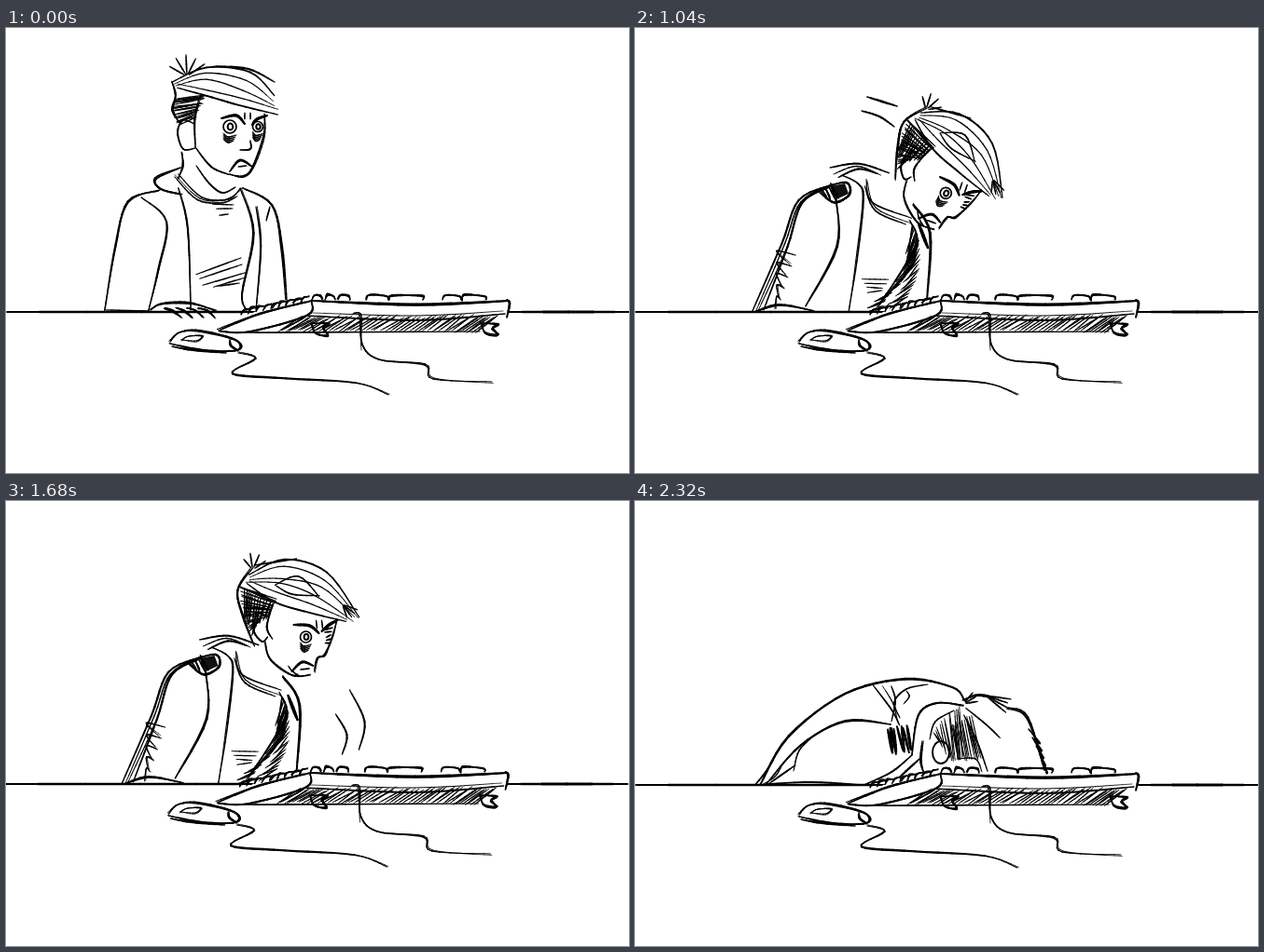
An HTML page with a canvas for the animation above (3230 ms loop, 668 by 478 pixels).

```html
<!DOCTYPE html>
<html lang="en">
<head>
<meta charset="utf-8">
<title>Desk</title>
<style>
html, body { margin: 0; width: 100%; height: 100%; overflow: hidden; background: #fff; }
canvas { display: block; }
</style>
</head>
<body>
<canvas id="stage" width="668" height="478"></canvas>
<script>
const g = document.getElementById('stage').getContext('2d');
const rad = Math.PI / 180;
let seed = 1;
const rnd = () => (seed = seed * 16807 % 2147483647) / 2147483647 - 0.5;

const points = s => s.split(' ').map(p => p.split(',').map(Number));
const mix = (p, q, t) => p.map((v, n) => v + (q[n] - v) * t);
const shake = (p, r) => p.map(v => v + rnd() * r);

// Catmull-Rom position at t in 0..1
function along(pts, t) {
  const last = pts.length - 1, i = Math.min(last - 1, Math.floor(t * last)), u = t * last - i;
  const at = k => pts[Math.max(0, Math.min(last, k))];
  const [a, b, c, d] = [at(i - 1), at(i), at(i + 1), at(i + 2)];
  return b.map((v, n) => v + 0.5 * u * (c[n] - a[n] +
    u * (2 * a[n] - 5 * v + 4 * c[n] - d[n] + u * (3 * (v - c[n]) + d[n] - a[n]))));
}

// Brush line, thinner at both ends
function brush(pts, w) {
  const n = (pts.length - 1) * 6;
  for (let i = 0; i < n; i++) {
    g.lineWidth = w * (0.65 + 0.45 * Math.sin(Math.PI * (i + 0.5) / n));
    g.beginPath();
    g.moveTo(...along(pts, i / n));
    g.lineTo(...along(pts, (i + 1) / n));
    g.stroke();
  }
}

const pen = (s, w = 1.7) => brush(points(s), w);

// A firm line with a loose one over it
function rough(s, w = 1.9, warp = p => p) {
  const pts = points(s).map(warp);
  brush(pts, w);
  brush(pts.map(p => shake(p, 3)), w * 0.7);
}

// Strokes running from guide a across to guide b
function shade(a, b, n, w = 1.1) {
  const [p, q] = [points(a), points(b)];
  for (let i = 0; i < n; i++) {
    const t = i / (n - 1);
    brush([shake(along(p, t), 3), shake(along(q, t), 4)], w);
  }
}

// Curves blending guide a into guide b
function strands(a, b, n, w = 1.5) {
  const [p, q] = [points(a), points(b)];
  for (let i = 0; i < n; i++) {
    const t = i / (n - 1), edge = t % 1 ? 5 : 1;
    brush(p.map((v, k) => shake(mix(v, q[k], t), edge)), t % 1 ? w * 0.8 : w * 1.2);
  }
}

// Spikes around a centre, angles in degrees
function fan(x, y, near, far, from, to, n, w = 1.6) {
  for (let i = 0; i < n; i++) {
    const a = (from + (to - from) * i / (n - 1)) * rad, r = far + rnd() * 5;
    brush([[x + near * Math.cos(a), y + near * Math.sin(a)], [x + r * Math.cos(a), y + r * Math.sin(a)]], w);
  }
}

function fill(s, color = '#fff') {
  g.fillStyle = color;
  g.beginPath();
  points(s).forEach(p => g.lineTo(...p));
  g.fill();
}

function oval(x, y, rx, ry, w = 1.7) {
  g.lineWidth = w;
  g.beginPath();
  g.ellipse(x, y, rx, ry, 0, 0, 7);
  g.stroke();
}

function eye(x, y, r) {
  oval(x, y, r, r);
  oval(x + 0.5, y, r * 0.4, r * 0.5, 2);
  for (let i = 0; i < 4; i++) {
    const d = r + 2 + i * 2;
    brush([[x - r, y + d - 2], [x - 2, y + d + 2], [x + r - i, y + d]], 1.3);
  }
}

function desk() {
  pen('1,305 290,305', 2.4);
  pen('538,305 668,305', 2.6);
}

function keyboard() {
  fill('228,326 270,303 327,292 440,295 540,293 538,308 526,318 508,327 300,327 250,328');
  rough('228,325 272,307 327,293', 2.2);
  rough('229,326 262,326 322,309 328,294', 2);
  rough('328,293 440,297 537,293', 2.8);
  pen('322,309 440,314 535,307', 2);
  pen('329,306 440,309 533,304', 1);
  pen('537,292 540,296 537,311', 2.4);
  pen('250,327 300,327 508,326', 1.6);
  shade('292,325 505,326', '318,311 528,309', 52, 1.2);
  for (const x of [328, 510]) {
    rough(`${x},317 ${x + 18},318 ${x + 12},322 ${x + 17},330 ${x + 4},328 ${x},317`, 2);
  }
  // keys
  for (let x = 252; x < 318; x += 8) {
    const y = 306 - (x - 252) * 0.21;
    rough(`${x},${y + 2} ${x + 3},${y - 3} ${x + 9},${y - 4}`, 1.7);
  }
  for (const [x, w] of [[328, 11], [342, 11], [356, 13], [386, 24], [411, 36], [468, 20], [489, 26]]) {
    rough(`${x},292 ${x + 3},287 ${x + w - 2},288 ${x + w},292`, 1.7);
  }
  // lead
  rough('373,306 381,309 382,340 400,356 449,362 458,377 521,380', 1.5);
  pen('379,307 381,346', 1);
}

function mouse() {
  fill('176,338 190,325 215,325 246,335 248,346 215,346 185,342');
  rough('176,337 186,327 208,325 246,335 248,346 214,346 176,339', 2);
  rough('188,335 196,331 210,331 204,336 188,335', 1.2);
  pen('240,335 241,341 248,346', 2.4);
  pen('178,342 200,346 236,349', 2);
  rough('249,349 268,355 243,371 300,376 375,381 410,394', 1.6);
}

function headUp() {
  strands('178,58 215,42 262,47 288,72', '184,64 215,73 250,83 291,93', 5);
  pen('225,41 260,44 288,58', 2);
  fan(194, 52, 3, 22, -150, -35, 5);
  rough('178,58 182,72 178,88 186,102', 1.7);
  shade('182,76 179,88 185,103', '214,72 207,84 203,96', 22, 1.2);
  rough('207,76 202,98 203,128', 1.6);
  pen('202,103 190,99 184,112 190,130 203,129', 1.8);
  rough('203,128 220,149 238,157', 1.7);
  rough('277,92 276,116 264,150 254,159 238,157', 1.7);
  pen('231,97 247,94 256,103', 2.9);
  pen('264,104 269,98 280,94', 2.9);
  eye(240, 106, 7);
  eye(270, 106, 5.5);
  for (const x of [256, 262]) pen(`${x},91 ${x},98`, 1.3);
  pen('262,121 262,130 251,131', 1.8);
  pen('240,154 251,142 264,149', 2.5);
  pen('249,149 258,148', 1.5);
}

// pull draws the near elbow back along the desk
function bodyUp(pull) {
  const warp = ([x, y]) => [x - pull * Math.max(0, Math.min(1, (y - 190) / 110)), y];
  rough('165,174 131,187 117,235 106,303', 2, warp);
  rough('145,182 172,208 163,260 153,303', 1.8, warp);
  rough('107,304 153,304', 1.6, warp);
  rough('188,133 190,148 184,162', 1.6);
  pen('204,148 218,167 232,177 246,171', 1.8);
  rough('187,150 160,161 166,173 188,179', 2);
  strands('185,157 210,182 238,184 251,172', '181,160 205,184 232,188 248,181', 3, 1.3);
  rough('185,172 195,215 198,303', 1.7);
  rough('251,172 265,220 253,285 258,303', 1.8);
  rough('268,192 273,235 268,303', 1.7);
  rough('254,172 285,190 296,235 301,292', 2.2);
  pen('283,192 279,207', 1.6);
  shade('205,266 212,275 230,278', '250,248 256,261 252,276', 5, 1.4);
  shade('221,190 229,200', '243,190 240,200', 3, 1.3);
}

// size 1 spreads the whole hand, 0 hides it
function hand(size) {
  if (!size) return;
  const x = 155, tip = x + 70 * size, drop = size > 0.9 ? 7 : 0;
  rough(`${x},303 ${x + 12},296 ${mix([x], [tip], 0.6)},295 ${tip},304`);
  for (let i = 0; i < 4; i++) {
    const k = x + (15 + i * 12) * size;
    rough(`${k},${297 + drop / 2} ${k + 9 * size},${300 + drop / 2} ${k + 18 * size},${304 + drop}`, 1.8);
  }
}

function bodyLean() {
  strands('212,168 176,185 157,232 126,304', '208,171 179,188 163,235 138,303', 4, 1.7);
  rough('215,182 217,235 183,299', 1.9);
  rough('130,304 155,297 192,304', 1.9);
  for (let y = 236; y < 290; y += 12) rough(`${172 - (y - 236) / 3},${y + 8} 152,${y + 4} ${166 - (y - 236) / 3},${y + 18}`, 1.2);
  fill('209,170 225,167 229,178 216,184', '#111');
  rough('198,173 226,166 230,179 213,187 198,175', 2.2);
  shade('200,172 211,168', '207,183 218,184', 6, 1.7);
  strands('209,150 240,146 272,156', '218,160 240,151 260,156', 3, 1.6);
  rough('222,158 240,168 245,185 238,250 229,304', 1.6);
  strands('248,163 255,187 297,204', '246,170 258,196 290,211', 3, 1.3);
  shade('298,212 300,250 262,300', '292,240 285,270 248,304', 26, 1.4);
  shade('304,225 303,260 292,290', '298,246 288,276 272,300', 16, 1.3);
  rough('295,207 300,235 258,304', 1.8);
  rough('298,190 316,220 313,290', 2.2);
  pen('304,210 314,236', 3.4);
  shade('244,269 250,284', '270,270 266,283', 4, 1.2);
}

function headProfile() {
  strands('262,80 300,64 345,78 380,126', '260,90 290,110 328,121 366,130', 6);
  strands('290,91 315,82 337,103', '290,91 308,101 337,103', 2, 1.3);
  fan(266, 75, 3, 17, -130, -35, 4);
  pen('268,70 313,63', 1.8);
  fan(362, 112, 2, 17, 20, 70, 4, 1.5);
  rough('266,73 250,97 256,125 268,157', 1.9);
  shade('252,92 256,118 265,145', '290,108 282,120 270,132', 20, 1.4);
  shade('258,96 270,104 288,110', '258,126 266,136 280,126', 14, 1.4);
  pen('283,125 271,123 267,140 276,152 282,147', 1.9);
  rough('288,112 281,136 287,149', 1.6);
  rough('279,153 285,171 308,188 328,188', 1.8);
  rough('356,129 352,146 343,166 335,170 332,184', 1.8);
  pen('310,134 327,135 337,143', 3);
  pen('340,141 348,134 357,129', 3);
  eye(323, 147, 6);
  shade('343,139 345,154', '353,138 350,153', 5, 1.6);
  for (const x of [334, 340]) pen(`${x},129 ${x + 1},138`, 1.4);
  pen('308,184 319,174 331,178', 2.6);
  pen('317,182 327,181', 1.6);
  shade('304,178 311,186', '309,184 317,189', 3, 1.3);
}

function slump() {
  rough('135,304 165,253 225,207 290,191 340,200 353,214', 2.2);
  rough('140,305 178,262 225,237 274,240', 2);
  strands('128,305 139,293 148,278', '143,304 158,294 172,284', 3, 1.5);
  pen('170,290 176,268 192,252', 1.4);
  pen('140,304 190,302 245,305', 1.8);
  strands('255,198 275,224 284,241', '275,199 279,214 275,237', 3, 1.4);
  pen('284,233 278,216 291,202 314,197', 1.6);
  pen('288,218 294,210 291,204', 1.3);
  rough('297,273 304,230 324,217 352,220', 2);
  rough('308,258 306,278 309,291', 1.8);
  shade('271,245 293,242', '274,271 297,268', 9, 2.6);
  rough('297,273 275,291 246,305', 1.7);
  rough('305,277 284,296');
  // head
  rough('352,214 368,208 386,211', 2);
  rough('400,222 421,232 439,289', 2);
  fan(352, 218, 3, 17, -50, -10, 3);
  fan(376, 209, 3, 27, 8, 40, 4);
  for (let i = 0; i < 5; i++) rough(`${422 + i * 4},${245 + i * 9} ${434 + i * 2},${260 + i * 8} ${428 + i * 3},${256 + i * 8}`, 1.8);
  strands('355,222 376,240 391,254', '353,230 367,258 378,290', 2, 1.4);
  shade('320,250 332,234 348,222', '327,258 340,278 352,274', 14, 1.1);
  shade('340,242 360,230', '345,278 370,276', 16, 1.1);
  pen('316,256 322,237 342,225', 1.5);
  oval(328, 270, 9, 12, 2);
  pen('345,277 365,277 372,291', 1.3);
}

function impact() {
  for (let i = 0; i < 4; i++) {
    const x = 318 + i * 26, y = 120 + i * 8;
    pen(`${x},${y} ${x + 28},${y + 30} ${x + 40},${y + 70}`, 1.8);
  }
}

function upright(pull, size) {
  bodyUp(pull);
  headUp();
  hand(size);
}

function drop() {
  bodyLean();
  g.save();
  g.translate(294, 148);
  g.rotate(25 * rad);
  g.translate(-275, -137);
  headProfile();
  g.restore();
  pen('249,74 281,84', 2.2);
  pen('243,89 262,95 278,106', 2);
}

function lift() {
  bodyLean();
  headProfile();
  pen('355,230 367,252 362,273', 1.9);
  pen('370,204 386,238 380,268', 1.9);
}

function slam() {
  slump();
  impact();
}

// start time, pose, jolt of the whole stage
const cues = [
  [0, () => upright(0, 1)], [480, () => upright(5, 0.7)],
  [640, () => upright(8, 0.4)], [720, () => upright(10, 0)],
  [1040, drop], [1200, slam, 1], [1280, slam],
  [1440, lift, 1], [1600, slam], [1680, lift, 1], [1840, slam],
  [2000, lift, 1], [2160, slam], [2320, slump]
];
const LOOP = 3230;

function paint([, pose, jolt = 0]) {
  g.setTransform(1, 0, 0, 1, -1.5 * jolt, -jolt);
  g.fillStyle = '#fff';
  g.fillRect(-5, -5, 680, 490);
  g.strokeStyle = '#000';
  g.lineCap = g.lineJoin = 'round';
  desk();
  seed = 7;
  pose();
  seed = 99;
  keyboard();
  mouse();
}

const start = performance.now();
let shown;

function tick() {
  const t = (performance.now() - start) % LOOP;
  const cue = cues.findLast(c => c[0] <= t);
  if (cue !== shown) paint(shown = cue);
  requestAnimationFrame(tick);
}
tick();
</script>
</body>
</html>
```
